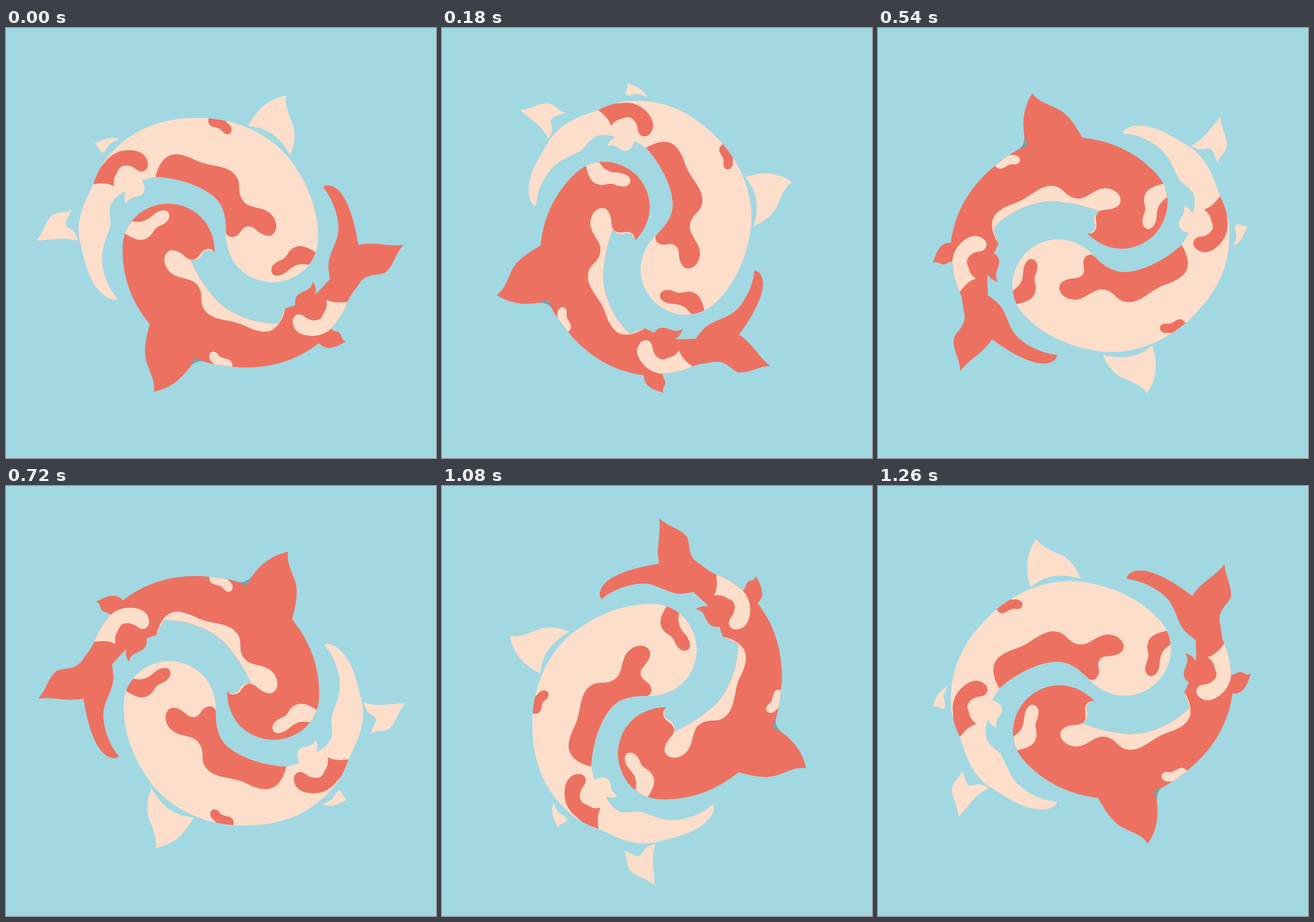
An HTML page with a canvas for the animation above (1.44 s loop, 635 px wide and 635 px high).

```html
<!DOCTYPE html>
<html lang="en">
<head>
<meta charset="utf-8">
<title>Circling koi</title>
<style>
  html, body { margin: 0; width: 100%; height: 100%; overflow: hidden; background: #a2d8e2; }
  canvas { display: block; width: 635px; height: 635px; }
</style>
</head>
<body>
<canvas id="pond" width="635" height="635"></canvas>
<script>
const ctx = document.getElementById('pond').getContext('2d');
const WATER = '#a2d8e2', CREAM = '#fcdecb', RED = '#ed7161', SHADE = '#7f9fa3';
const STEP = 180, ORIGIN = 317.25;

// Centre, turn in degrees and size of the pair at each step.
const poses = [
  [316.5, 317.5, 0, 1], [300, 310.5, 45, 0.975], [317, 316.5, 90, 1], [313, 319, 135, 0.99],
  [318.2, 316.8, 180, 1], [300.5, 300, 225, 1], [318, 318.5, 270, 1], [316, 302, 315.8, 1]
];

const path = d => new Path2D(d);

const markings = [
  // head
  path('M170 303 L187 285 C204 289 212 281 219 275 C228 268 238 267 241 273 C245 283 235 289 228 292 C217 296 219 305 209 310 C200 316 188 311 176 303Z'),
  // flank
  path(`M236 335 C240 327 246 327 252 329 C264 333 266 342 276 342 C288 341 287 326 300 326 C306 326 310 331 309 336
    L318 362 L350 395 L413 405 V415 C407 440 394 450 379 448 C362 446 355 438 338 434 C320 430 303 429 294 416
    C285 404 294 392 283 379 C275 368 256 371 245 362 C237 356 232 344 236 335Z`),
  // back
  path('M301 487 C299 477 309 475 314 482 C320 491 333 485 335 496 V506 L311 502 C309 493 302 493 301 487Z'),
  // tail root
  path(`M474 401 C486 407 495 405 507 404 L510 412 L488 436 C478 450 463 456 447 454 C431 452 424 444 424 432
    C426 422 435 420 443 427 C451 433 464 434 468 425 C471 417 476 415 474 401Z`)
];

const front = 'M240 259 C280 260 309 289 309 331 ';

const creamKoi = {
  skin: CREAM, spots: RED,
  body: path(front + `C308 360 315 375 326 385 C347 403 380 413 413 415 L433 410 C425 397 430 387 440 386
    C449 385 453 381 457 376 C460 383 459 389 457 393 C467 390 475 382 480 372 C482 353 477 350 481 338
    C487 320 493 309 492 290 C490 268 481 248 469 236 C471 231 479 234 485 237 C513 256 517 292 525 320
    C531 355 517 378 505 404 C501 416 495 429 487 440 C452 485 405 502 350 502
    C300 502 248 482 217 444 C192 412 172 370 173 325 C173 285 205 260 240 259Z`),
  fins: [
    path('M214 447 C203 475 208 489 214 501 C220 517 222 527 220 535 C248 530 264 513 276 490 C247 487 230 475 214 447Z'),
    path('M466 470 C487 465 483 454 490 451 C497 449 494 459 503 464 C491 470 477 476 466 470Z'),
    path('M527 320 C550 328 568 321 589 321 C578 332 576 349 566 358 C556 365 546 360 537 367 C542 353 549 347 543 341 C537 337 531 336 527 320Z')
  ]
};

const redKoi = {
  skin: RED, spots: CREAM,
  body: path(front + `C302 325 295 327 291 333 C288 341 281 344 273 342 C281 360 293 381 312 402
    C333 423 368 437 403 436 C409 425 411 418 413 414 L428 409 C426 396 433 392 442 388
    C449 385 453 381 454 374 C459 382 459 388 457 393 C467 386 470 379 479 371 C477 356 475 348 480 335
    C486 318 494 307 491 286 C488 265 479 247 469 235 C472 230 484 232 490 238 C508 253 517 294 521 320
    C548 315 562 323 588 320 C576 332 574 350 561 361 C547 367 532 360 520 381
    C513 390 509 395 505 404 C501 416 495 427 481 444 C487 449 492 447 495 452 C497 458 497 461 503 463
    C492 468 485 473 474 472 C468 470 465 468 463 465 C431 490 394 502 350 501
    C330 500 305 497 288 491 C281 488 278 495 272 501 C258 520 242 532 219 537
    C222 520 211 505 207 488 C204 470 209 453 213 437 C189 408 172 370 173 325
    C173 285 205 260 240 259Z`),
  shade: path('M272 500 C276 493 278 488 281 487 L292 492 C284 491 278 495 272 500Z'),
  fins: []
};

function drawKoi({ skin, spots, body, fins, shade }) {
  ctx.fillStyle = skin;
  ctx.fill(body);
  fins.forEach(fin => ctx.fill(fin));
  if (shade) {
    ctx.fillStyle = SHADE;
    ctx.fill(shade);
  }
  ctx.save();
  ctx.clip(body);
  ctx.fillStyle = spots;
  markings.forEach(mark => ctx.fill(mark));
  ctx.restore();
}

function placeKoi(koi, [x, y, turn, size], offset) {
  ctx.save();
  ctx.translate(x, y);
  ctx.rotate((turn + offset) * Math.PI / 180);
  ctx.scale(size, size);
  ctx.translate(-ORIGIN, -ORIGIN);
  drawKoi(koi);
  ctx.restore();
}

const start = performance.now();

function render(now) {
  const step = Math.floor(Math.max(0, now - start) / STEP) % poses.length;
  ctx.fillStyle = WATER;
  ctx.fillRect(0, 0, 635, 635);
  placeKoi(redKoi, poses[step], 0);
  placeKoi(creamKoi, poses[step], 180);
  requestAnimationFrame(render);
}

render(start);
</script>
</body>
</html>
```
